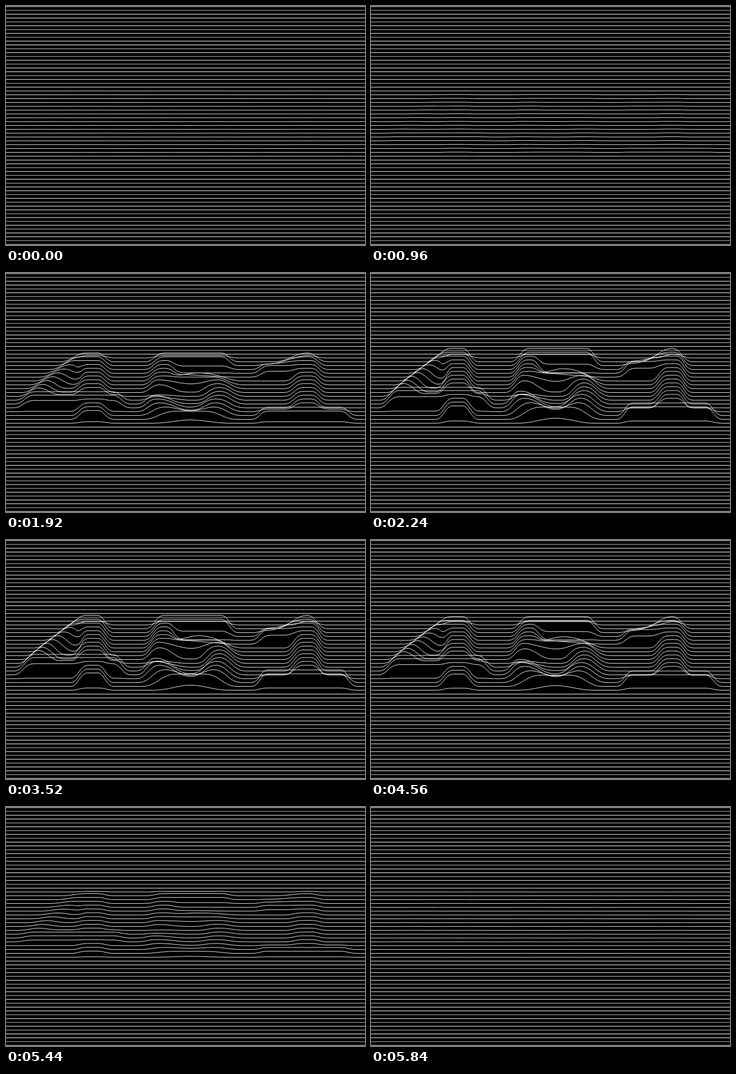
Recreate the animation shown at these times as an HTML page without scripts. Size 640x427 px, loop 6240 ms.

```html
<!DOCTYPE html>
<html lang="en">
<head>
<meta charset="utf-8">
<title>Line relief</title>
<style>
  @property --lift { syntax: "<number>"; inherits: true; initial-value: .002; }

  html, body { margin: 0; width: 100%; height: 100%; overflow: hidden; background: #000; }
  svg { display: block; width: 100vw; height: 100vh; animation: lift 6.24s infinite; }

  path { fill: none; stroke: #fff; stroke-width: .9; }
  .rules { stroke-width: 640; stroke-dasharray: .9 5.955; }
  .row { transform: translateY(calc(var(--k) * 6.855px)); }

  /* heights are drawn upward at full lift; the stroke keeps its weight */
  .row path, defs path { transform: scaleY(calc(-1 * var(--lift))); vector-effect: non-scaling-stroke; }

  @keyframes lift {
    0%     { --lift: .002; animation-timing-function: steps(1); }
    15.38% { --lift: .02;  animation-timing-function: steps(4); }
    20.51% { --lift: .165; animation-timing-function: steps(4); }
    25.64% { --lift: .39;  animation-timing-function: steps(4); }
    30.76% { --lift: .66;  animation-timing-function: steps(4); }
    35.89% { --lift: 1;    animation-timing-function: steps(1); }
    71.79% { --lift: 1;    animation-timing-function: steps(4); }
    76.92% { --lift: .66;  animation-timing-function: steps(4); }
    82.05% { --lift: .39;  animation-timing-function: steps(4); }
    87.17% { --lift: .165; animation-timing-function: steps(4); }
    92.3%  { --lift: .02;  animation-timing-function: steps(1); }
    93.58%, 100% { --lift: .002; }
  }
</style>
</head>
<body>
<svg viewBox="0 0 640 427" preserveAspectRatio="none">
  <defs>
    <path id="four-foot" d="M0 0H116C128 0 132 24 146 24H164C174 24 179 0 192 0H230"/>
    <path id="five-top" d="M230 0H248C264 0 266 24 282 24H384C396 24 400 0 414 0H430"/>
    <path id="one-stem" d="M430 0H496C512 0 514 24 530 24H544C558 24 558 0 574 0H640"/>
    <path id="one-base" d="M430 0H438C452 0 452 22.5 468 22.5H596C608 22.5 612 0 626 0H640"/>
  </defs>

  <g transform="translate(0 1)">
    <path class="rules" d="M320-.45V148M320 273.75V427"/>

    <g class="row" style="--k:22">
      <path d="M0 0H118C130 0 134 6.5 146 6.5H164C176 6.5 182 0 194 0H230"/>
      <path d="M230 0H250C264 0 268 6.5 282 6.5H384C396 6.5 400 0 414 0H430"/>
      <path d="M430 0H506C520 0 524 6.5 538 6.5S558 0 570 0H640"/>
    </g>
    <g class="row" style="--k:23">
      <path d="M0 0H98C115 0 126 24 142 24H164C174 24 179 0 192 0H230"/>
      <use href="#five-top"/>
      <path d="M430 0H478C504 0 514 24 537 24C552 24 556 0 574 0H640"/>
    </g>
    <g class="row" style="--k:24">
      <path d="M0 0H88C106 0 116 24 132 24H164C174 24 179 0 192 0H230"/>
      <use href="#five-top"/>
      <path d="M430 0H440C450 0 456 4 466 4C490 4 506 24 534 24H540C556 24 557 0 574 0H640"/>
    </g>
    <g class="row" style="--k:25">
      <path d="M0 0H78C96 0 106 24 122 24H164C174 24 179 0 192 0H230"/>
      <path d="M230 0H247C262 0 264 24 280 24H286C298 24 300 9.5 316 9.5H384C396 9.5 402 0 414 0H430"/>
      <path d="M430 0H438C452 0 452 15 468 15C494 17 508 24 530 24H544C558 24 558 0 574 0H640"/>
    </g>
    <g class="row" style="--k:26">
      <path d="M0 0H68C86 0 98 23 112 23S122 17 128 17S138 24 146 24H164C174 24 179 0 192 0H230"/>
      <path d="M230 0H246C261 0 263 24 279 24H286C298 24 300 1 318 1H390C400 1 404 0 412 0H430"/>
      <path d="M430 0H436C452 0 454 21 470 21H496C508 21 518 24 528 24H544C558 24 558 0 574 0H640"/>
    </g>
    <g class="row" style="--k:27">
      <path d="M0 0H60C78 0 88 22 102 22S118 13 127 13S136 24 146 24H164C174 24 179 0 192 0H230"/>
      <path d="M230 0H245C260 0 262 24 278 24H284C296 24 300 7 314 7S390 0 410 0H430"/>
      <path d="M430 0H436C454 0 454 16 472 16H496C510 16 516 24 530 24H544C558 24 558 0 574 0H640"/>
    </g>
    <g class="row" style="--k:28">
      <path d="M0 0H51C68 0 79 22 92 22S112 5 124 5S136 24 146 24H164C174 24 179 0 192 0H230"/>
      <path d="M230 0H243C258 0 260 24 276 24H284C294 24 298 16 308 16S330 22 342 22C380 22 394 0 422 0H430"/>
      <use href="#one-stem"/>
    </g>
    <g class="row" style="--k:29">
      <path d="M0 0H43C60 0 70 22 83 22S106 1 120 1S134 24 146 24H164C174 24 179 0 192 0H230"/>
      <path d="M230 0H242C257 0 259 24 275 24H284C296 24 300 21 312 21H370C392 21 398 0 424 0H430"/>
      <use href="#one-stem"/>
    </g>
    <g class="row" style="--k:30">
      <path d="M0 0H36C52 0 60 22 73 22S92 1 108 1H116C128 1 132 24 146 24H164C174 24 179 0 192 0H230"/>
      <path d="M230 0H240C256 0 258 24 272 24C290 24 310 13 330 13S360 24 378 24C396 24 402 0 426 0H430"/>
      <use href="#one-stem"/>
    </g>
    <g class="row" style="--k:31">
      <path d="M0 0H29C45 0 52 22 65 22S88 1 102 1H116C128 1 132 24 146 24H164C174 24 179 0 192 0H230"/>
      <path d="M230 0H240C254 0 258 21 274 21C294 21 300 1 324 1H336C352 1 356 24 378 24C398 24 402 0 426 0H430"/>
      <use href="#one-stem"/>
    </g>
    <g class="row" style="--k:32">
      <path d="M0 0H22C38 0 44 23 58 23S80 5 95 5H116C128 5 132 24 146 24H164C176 24 178 5 192 5C204 5 206 0 216 0H230"/>
      <path d="M230 0H240C256 0 258 4 274 4S310 0 322 0H340C358 0 362 24 380 24C400 24 404 0 428 0H430"/>
      <use href="#one-stem"/>
    </g>
    <g class="row" style="--k:33">
      <path d="M0 0H17C32 0 36 23 52 23H190C204 23 208 0 222 0H230"/>
      <path d="M230 0H236C252 0 254 10 268 10S312 0 326 0H340C358 0 362 24 380 24C400 24 404 0 428 0H430"/>
      <use href="#one-stem"/>
    </g>
    <g class="row" style="--k:34">
      <path d="M0 0H15C31 0 34 24 50 24H190C204 24 208 0 222 0H230"/>
      <path d="M230 0H232C250 0 250 23 266 23C292 23 296 1 326 1H338C356 1 360 24 380 24C400 24 404 0 428 0H430"/>
      <use href="#one-stem"/>
    </g>
    <g class="row" style="--k:35">
      <path d="M0 0H14C28 0 32 20 50 20H118C130 20 134 24 146 24H164C176 24 180 20 190 20C204 20 208 0 222 0H230"/>
      <path d="M230 0H232C250 0 252 24 268 24C296 24 304 2 328 2S352 24 376 24C396 24 402 0 426 0H430"/>
      <use href="#one-stem"/>
    </g>
    <g class="row" style="--k:36">
      <path d="M0 0H20C30 0 30 1 40 1H116C128 1 132 24 146 24H164C174 24 180 1 192 1S215 0 222 0H230"/>
      <path d="M230 0H232C252 0 254 24 274 24C296 24 306 4 329 4S356 24 374 24C394 24 400 0 424 0H430"/>
      <path d="M430 0H438C452 0 452 7 468 7H496C512 7 514 24 530 24H544C558 24 558 7 574 7H594C606 7 610 0 624 0H640"/>
    </g>
    <g class="row" style="--k:37">
      <use href="#four-foot"/>
      <path d="M230 0H236C258 0 262 23 284 23C300 23 312 13 329 13S358 23 370 23C392 23 396 0 420 0H430"/>
      <use href="#one-base"/>
    </g>
    <g class="row" style="--k:38">
      <use href="#four-foot"/>
      <path d="M230 0H244C268 0 276 22 304 22H354C380 22 388 0 410 0H430"/>
      <use href="#one-base"/>
    </g>
    <g class="row" style="--k:39">
      <path d="M0 0H116C128 0 132 4 146 4H164C176 4 182 0 194 0H230"/>
      <path d="M230 0H262C290 0 306 9 329 9S372 0 396 0H430"/>
      <path d="M430 0H438C452 0 452 4 468 4H596C608 4 612 0 626 0H640"/>
    </g>
  </g>
</svg>
</body>
</html>
```
